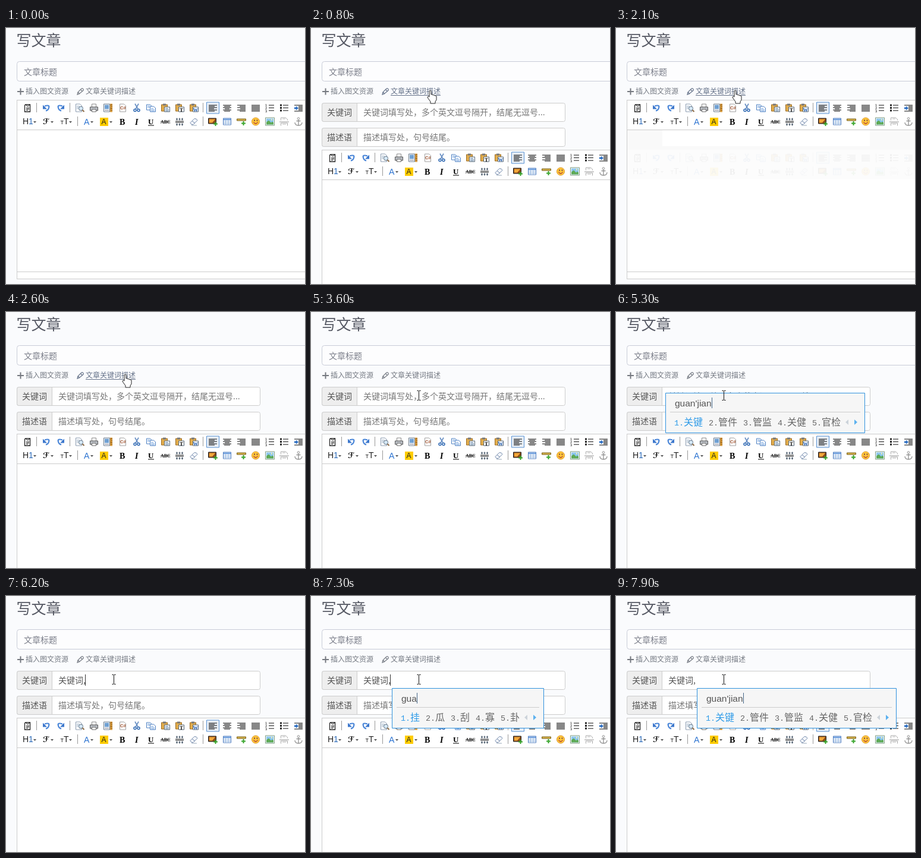
These frames come from a looping animation (503x431 px, 8 s). An HTML page:

```html
<!DOCTYPE html>
<html lang="zh-CN">
<head>
<meta charset="utf-8">
<style>
  html, body { margin: 0; width: 100%; height: 100%; overflow: hidden; background: #fafbfd; }
  svg { display: block; font-family: "Noto Sans CJK SC", "Noto Sans CJK", sans-serif; }
  .latin { font-family: "Liberation Sans", sans-serif; }
  .mono { font-family: "Liberation Mono", monospace; font-size: 13.4px; }
  .serif { font-family: "Liberation Serif", serif; font-weight: bold; font-size: 14px; }
</style>
</head>
<body>
<svg width="503" height="431" viewBox="0 0 503 431">
  <text x="17.5" y="30" font-size="25" fill="#555863">写文章</text>
  <rect x="18.5" y="56.5" width="510" height="33" rx="4" fill="#fdfdfe" stroke="#c9ccd8"/>
  <text x="30" y="79" font-size="14" fill="#7b7e8a">文章标题</text>
  <g font-size="12" fill="#767b84">
    <path d="M19 107h11M24.500 101.500v11" stroke="#757980" stroke-width="2"/>
    <text x="33" y="111">插入图文资源</text>
    <g id="link">
      <path d="M120 112l1-4 6-6q2-1 3 1t-1 3l-6 5zM125.500 103.500l3 3M121 108l3 3" fill="none" stroke="currentColor" stroke-width="1.200"/>
      <text x="134" y="111" fill="currentColor">文章关键词描述</text>
      <path id="underline" d="M134 113.500h84" stroke="currentColor"/>
    </g>
  </g>

  <g id="fields"></g>

  <g id="editor">
    <rect x="18.500" y="121.500" width="510" height="301" fill="#fff" stroke="#ccc"/>
    <path d="M19 171.500h490M19 410.500h490" stroke="#ccc"/>
    <g id="ghost">
      <path d="M19 172h484v33H19z" fill="#f9f9f9"/>
      <path d="M19 205h484v50H19z" fill="#fcfcfc"/>
      <path d="M78 172h349v27H78z" fill="#fff"/>
      <use href="#bar" y="84" opacity=".05"/>
    </g>
    <g id="bar"></g>
  </g>

  <path id="caret" d="M.5 132v19" stroke="#333"/>
  <g id="popup"></g>
  <g id="pointer">
    <path id="beam" d="M-3-8.500H-.500M.500-8.500H3M0-8V7M-3 7.500H-.500M.500 7.500H3" stroke="#111" fill="none"/>
    <path id="arrow" d="M0 0v16l4-4 3 6 2-1-3-6h5z" fill="#fff" stroke="#222"/>
    <path id="hand" d="M-2 0q2-2 3 0v6q2-1 3 1 2-1 3 1 2-1 3 1v6l-2 3v3H0v-3l-5-7q0-3 3-1z" fill="#fff" stroke="#222"/>
  </g>
</svg>
<script>
const $ = id => document.getElementById(id);
const show = (id, on) => $(id).setAttribute('display', on ? 'inline' : 'none');
const place = (id, x, y) => $(id).setAttribute('transform', `translate(${x} ${y})`);

// Static markup helpers
const line = (d, stroke = '#222', width = 1, fill = 'none') =>
  `<path d="${d}" stroke="${stroke}" stroke-width="${width}" fill="${fill}"/>`;
const fill = (d, color) => `<path d="${d}" fill="${color}"/>`;
const label = (x, y, text, color = '#222', cls = 'latin', size = 14, extra = '') =>
  `<text x="${x}" y="${y}" fill="${color}" class="${cls}" style="font-size:${size}px" ${extra}>${text}</text>`;
const page = (color, d = 'M3.5 1.5h7l3 3v10h-10z') => line(d, color, 1, '#fff');
const rows = (list, x0 = 1, step = 2) =>
  line(list.map((w, i) => `M${Array.isArray(w) ? w[0] : x0} ${3.5 + i * step}h${Array.isArray(w) ? w[1] : w}`).join(''), '#111');
const drop = x => fill(`M${x} 157h5l-2.500 3z`, '#555');
const paste = mark => line('M1.5 2.5h10v11h-10z', '#9a6a20', 1, '#e2ad4d') +
  fill('M4 1h5v3H4z', '#777') + page('#567', 'M6.5 6.5h9v8h-9z') + mark;
const undo = line('M5 5Q14 2 12 8 11 12 7 13', '#4a86d8', 2.2) + fill('M2 3v7h7z', '#3a76cc');

const topIcons = {
  36: line('M3.5 4.5q0-2 2-2h7v12h-9z', '#222', 1.3, '#fff') + line('M5 2l2 3h3l2-3M6 8h5M6 10h5M6 12h3', '#222'),
  68: undo,
  92: `<g transform="matrix(-1 0 0 1 16 0)">${undo}</g>`,
  124: page('#8a9bb0', 'M1.5 1.5h7l3 3v10h-10z') + line('M3 5h5M3 7h4M3 9h3', '#a9bccf') +
    `<circle cx="10" cy="9" r="3.500" fill="#d5e8f6" stroke="#678"/>` + line('M12.500 11.500l3 3', '#8a6a45', 2),
  148: page('#888', 'M4.5 1.5h7v6h-7z') + line('M1.5 6.5h13v6h-13z', '#555', 1, '#b8bcc2') + page('#666', 'M4.5 10.5h7v4h-7z'),
  172: page('#678', 'M.5 1.5h10v13H.5z') + fill('M2 3h7v7H2z', '#6fa0d2') + line('M2 12h7', '#889') +
    fill('M11 1h4v14h-4z', '#d89a3c') + line('M12 3h3M13 6h2M12 9h3M13 12h2', '#875a20'),
  196: page('#a0a0a0') + label(4, 10, 'C#', '#a0522d', 'latin', 7.5, 'font-weight="bold"'),
  220: line('M5 1l5 9M11 1L6 10', '#6b91c4', 1.7) +
    line('M3 12a2 2 0 1 0 4 0a2 2 0 1 0-4 0M9 12a2 2 0 1 0 4 0a2 2 0 1 0-4 0', '#2d67b2', 1.5),
  244: page('#4b7fc2', 'M.5 2.5h6l2 2v7h-8z') + page('#4b7fc2', 'M6.5 5.5h6l3 3v6h-9z') +
    line('M2 5h4M2 7h4M8 9h4M8 11h6M8 13h6', '#7faae0'),
  268: paste(line('M8 9h5M8 11h6M8 13h6', '#68a')),
  292: paste(label(8, 14, 'T', '#111', 'serif', 9)),
  316: paste(label(6.7, 14, 'W', '#1f5aab', 'serif', 8.5)),
  348: line('M-2.500-1.500h21v19h-21z', '#5690d2', 1, '#e9eff6') + rows([14, 10, 14, 9, 14, 10]),
  372: rows([14, [3, 10], 14, [4, 8], 14, [3, 10]]),
  396: rows([14, [5, 10], 14, [6, 9], 14, [5, 10]]),
  420: rows([14, 14, 14, 14, 14, 14]),
  444: rows([9, 9, 9], 6, 4.5) + [1, 2, 3].map((n, i) => label(0, 5.5 + i * 5, n, '#111', 'latin', 6)).join(''),
  468: rows([9, 9, 9], 6, 4.5) + fill('M1 2h3v3H1zM1 6.500h3v3H1zM1 11h3v3H1z', '#222'),
  492: rows([14, [8, 7], [8, 7], [8, 7], [8, 7], 14]) + fill('M1 7h3V5l4 3.500L4 12v-2H1z', '#2f70c4'),
};
const lowIcons = {
  196: label(3, 13, 'B', '#000', 'serif'),
  220: label(5, 13, 'I', '#000', 'serif', 14, 'font-style="italic"'),
  244: label(3, 12, 'U', '#000', 'serif', 13) + line('M3 14.500h10', '#000'),
  268: label(0, 11, 'ABC', '#222', 'serif', 8) + line('M0 8.500h16', '#222'),
  292: line('M1 7.500h14M1 9.500h14', '#222', 1) + line('M3.500 2v4M8 2v4M12.500 2v4M3.500 11v4M8 11v4M12.500 11v4', '#456', 1.3) +
    line('M2 4h3M6.500 4h3M11 4h3M2 13h3M6.500 13h3M11 13h3', '#456'),
  316: line('M2 10l7-7q4 0 5 3l-7 7H4z', '#7187a8', 1, '#f5f8fd') + line('M5 7l5 4', '#7187a8') + line('M4 14.500h9', '#9ab'),
  348: line('M.5 2.5h13v9H.5z', '#222', 1, '#8a4b18') + fill('M2 4h10l-5 6H2z', '#f2a83a') + line('M9 12h7M12.500 8.500v7', '#39a52d', 2),
  372: line('M1.500 2.500h13v11h-13z', '#527fc0', 1, '#fff') + fill('M2 3h12v3H2z', '#79a5df') +
    line('M2 8.500h12M2 11h12M5.500 6v8M10 6v8', '#9dbce2'),
  396: line('M.5 3.500h15v3H.5z', '#7b6320', 1, '#d8b34a') + line('M8 11h7M11.500 7.500v7', '#39a52d', 2),
  420: '<circle cx="8" cy="8" r="6.500" fill="#ffc73b" stroke="#dc9525"/>' + fill('M5 5h2v2H5zM9.500 5h2v2h-2z', '#744') + line('M4.500 9q3.500 5 7 0', '#a33', 1.3),
  444: line('M.5 1.5h15v13H.5z', '#7a9a80', 1, '#fff') + fill('M2 3h12v10H2z', '#8cc6ee') + fill('M2 13V9l4-3 4 4 2-2 2 2v3z', '#5eaa55') + fill('M10 4h2v2h-2z', '#fff2a0'),
  468: page('#aaa', 'M2.500 6V1.500h8l3 3V6') + page('#aaa', 'M2.500 15v-4.500h11V15') + line('M0 8.500h16', '#999') + line('M5 3.500h5M5 12.500h6', '#bbb'),
  492: line('M8 5v10M4.500 7h7M2 9.500q0 5 6 5t6-5', '#929292', 1.3) + '<circle cx="8" cy="3" r="1.800" fill="none" stroke="#929292"/>',
};
const iconRow = (icons, y) => Object.entries(icons)
  .map(([x, body]) => `<g transform="translate(${x - 8} ${y - 8})">${body}</g>`).join('');

$('bar').innerHTML = iconRow(topIcons, 134.5) + iconRow(lowIcons, 157.5) +
  line('M51.500 126v16M107.500 126v16M331.500 126v16M120.500 149v16M331.500 149v16', '#999') +
  label(28, 162, 'H') + label(38, 162, '1', '#2868b8') +
  label(62, 162, 'ℱ', '#111', '', 13, 'font-family="DejaVu Sans, sans-serif" font-weight="bold"') +
  label(91.5, 162, 'T', '#111', 'latin', 9) + label(97, 162, 'T') +
  label(131, 163, 'A', '#2b73d1') + fill('M158 151h14v14h-14z', '#fc0') + label(160.5, 162, 'A', '#222', 'latin', 12) +
  [46, 75, 106, 142, 174].map(drop).join('');

const field = (y, name, hint, id) => `
  <rect x="18.5" y="${y + .5}" width="409" height="31" rx="3" fill="#fff" stroke="#ccc"/>
  <path d="M77.500 ${y + .5}H21.500q-3 0-3 3v25q0 3 3 3h56z" fill="#eee" stroke="#ccc"/>
  <g font-size="14"><text x="27" y="${y + 21}" fill="#555">${name}</text>
  <text id="${id}" x="88" y="${y + 21}" fill="#777">${hint}</text></g>`;
const keywordHint = '关键词填写处，多个英文逗号隔开，结尾无逗号...';
$('fields').innerHTML = field(126, '关键词', keywordHint, 'keyword') +
  field(168, '描述语', '描述填写处，句号结尾。', 'description');

// Input method: typed letters and their candidates
const words = {
  "g": '个 过 给 该 跟',
  "gu": '古 姑 顾 股 鼓',
  "gua": '挂 瓜 刮 寡 卦',
  "guan": '关 管 官 观看 管理',
  "guan'j": '关键 管家 关节 关军 管教',
  "guan'ji": '关机 官机 管机 关系 观记',
  "guan'jia": '管家 官家 关家 冠佳 观价',
  "guan'jian": '关键 管件 管监 关健 官检',
  "guan'jian'c": '关键词 关键处 关键层 关键 管件',
  "guan'jian'ci": '关键词 关键 管件 管监 关健',
};
const typed = Object.keys(words);

function typedIndex(t) {
  if (t < 4100) return -1;
  if (t < 4700) return 0;
  if (t < 5600) return 1 + Math.floor((t - 4700) / 100);
  if (t >= 7600) return 4 + Math.floor((t - 7600) / 100);
  return [7000, 7100, 7300, 7400].filter(start => t >= start).length - 1;
}

let shownIndex = -1;
function drawPopup(index) {
  if (index === shownIndex) return;
  shownIndex = index;
  if (index < 0) return $('popup').replaceChildren();
  const list = words[typed[index]].split(' ');
  const w = 176 + 16 * list.join('').length;
  let x = 15;
  const candidates = list.map((word, i) => {
    const color = i ? '#666' : '#2f9be8';
    const item = `<text x="${x}" y="55" class="mono" fill="${color}">${i + 1}.</text>` +
      `<text x="${x + 16}" y="55" font-size="16" font-weight="300" fill="${color}">${word}</text>`;
    x += 26 + 16 * word.length;
    return item;
  }).join('');
  $('popup').innerHTML = line(`M.5.5h${w - 1}v67H.5z`, '#2f91dd', 1, '#f6f6f6') +
    line(`M8 32.500H${w - 8}`, '#ccc') +
    `<text id="letters" x="16" y="23" class="latin" font-size="15.500" fill="#555">${typed[index]}</text>` +
    candidates + fill(`M${w - 28} 45v9l-5-4.500z`, '#ccd3da') + fill(`M${w - 18} 45v9l5-4.500z`, '#5cb1ef');
  const end = Math.round(16 + $('letters').getComputedTextLength()) + .5;
  $('popup').insertAdjacentHTML('beforeend', line(`M${end} 8v18`, '#468'));
}

const moves = [[100, 322, 77], [300, 267, 76], [500, 222, 98], [600, 201, 106], [2700, 201, 106], [3000, 181, 141]];
function pointerAt(t) {
  const next = moves.findIndex(m => m[0] > t);
  if (next < 0) return moves.at(-1).slice(1);
  const [a, b] = [moves[Math.max(0, next - 1)], moves[next]];
  const k = Math.max(0, (t - a[0]) / (b[0] - a[0]));
  return [1, 2].map(i => Math.round(a[i] + (b[i] - a[i]) * k));
}

const within = (t, spans) => spans.some(([from, to]) => t >= from && t < to);

function draw(time) {
  const t = Math.floor(time % 8000 / 100) * 100;
  const open = within(t, [[800, 2100], [2600, 8000]]);
  const hover = within(t, [[600, 2800]]);

  show('fields', open);
  place('editor', 0, open ? 84 : 0);
  show('ghost', within(t, [[2100, 2600]]));
  show('underline', hover);
  $('link').setAttribute('color', hover ? '#66738a' : '#767b84');

  const text = t < 5600 ? keywordHint : t < 6200 ? '关键词' : '关键词,';
  if ($('keyword').textContent !== text) $('keyword').textContent = text;
  $('keyword').setAttribute('fill', t < 5600 ? '#777' : '#555');
  show('caret', within(t, [[3100, 3600], [4100, 4500], [5600, 6000], [6200, 6700], [7200, 7700]]));
  place('caret', t < 5600 ? 88 : t < 6200 ? 130 : 133, 0);

  drawPopup(typedIndex(t));
  place('popup', ...(within(t, [[4700, 5600]]) ? [83, 136] : [136, 155]));

  const [x, y] = pointerAt(t);
  const overInput = y < 90 || (open && y >= 126);
  show('pointer', t >= 100);
  show('beam', overInput);
  show('hand', hover);
  show('arrow', !hover && !overInput);
  place('pointer', x + (overInput ? .5 : 0), y);
}

const start = performance.now();
function tick() {
  draw(performance.now() - start);
  requestAnimationFrame(tick);
}
tick();
</script>
</body>
</html>
```
